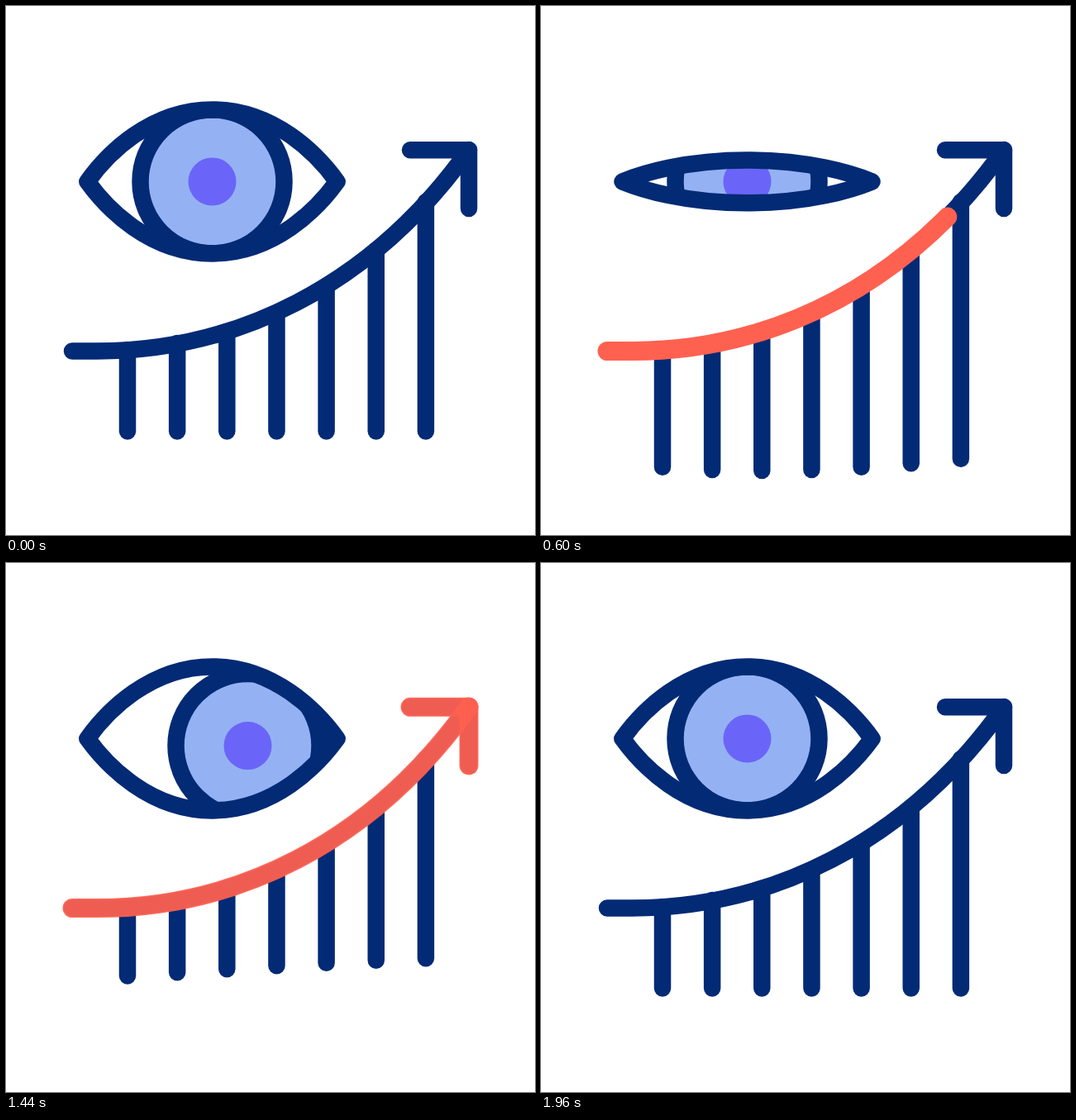
Animation, 640 px wide and 640 px high, one loop 2000 ms. Source, as an HTML page:

```html
<!DOCTYPE html>
<html lang="en">
<head>
<meta charset="utf-8">
<title>Vision and growth</title>
<style>
  html, body { margin: 0; width: 100%; height: 100%; overflow: hidden; background: #fff; }
  svg { display: block; width: 100vw; height: 100vh; }
  .line { fill: none; stroke: #032a75; stroke-width: 20.5; stroke-linecap: round; stroke-linejoin: round; }
  .hot { stroke: #ff6150; stroke-width: 23; }
</style>
</head>
<body>
<svg viewBox="0 0 640 640">
  <clipPath id="lid"><path id="lidShape"/></clipPath>
  <g clip-path="url(#lid)">
    <g id="iris">
      <circle class="line" cx="249.5" cy="212.4" r="87" style="fill:#94b2f3"/>
      <circle cx="249.5" cy="212.4" r="29" fill="#6a65f8"/>
    </g>
  </g>
  <path id="eye" class="line"/>
  <g id="bars"></g>
  <path class="line" d="M80 417.5H110C275 417.5 440 342 560 174"/>
  <path class="line" d="M489 174.3H560V245"/>
  <path id="trend" class="line hot" pathLength="1" d="M80 417.5H110C275 417.5 440 342 560 174"/>
  <path id="head" class="line hot"/>
</svg>
<script>
  const LOOP = 2000, STEP = 40;
  const $ = id => document.getElementById(id);

  // Each track is a list of [time, value], eased in and out between stops.
  const tracks = {
    lid: [[0, 1], [520, 0.257], [1080, 1]],
    look: [[1000, 0], [1400, 1], [1480, 1], [1960, 0]],
    bar: [[80, 0], [520, 47.5], [1120, -38.3], [1680, 0]],
    trend: [[80, 0], [800, 1]],
    head: [[720, 0], [1160, 1]],
    heat: [[1360, 1], [1890, 0]]
  };

  function at(track, t) {
    if (t <= track[0][0]) return track[0][1];
    for (let i = 1; i < track.length; i++) {
      const [t0, a] = track[i - 1], [t1, b] = track[i];
      if (t < t1) {
        const k = (t - t0) / (t1 - t0);
        return a + (b - a) * k * k * (3 - 2 * k);
      }
    }
    return track[track.length - 1][1];
  }

  // Height of each bar's top on the trend curve.
  const tops = [416, 408, 394, 371, 338.5, 296, 237];
  const bars = tops.map(() => {
    const bar = document.createElementNS("http://www.w3.org/2000/svg", "path");
    bar.setAttribute("class", "line");
    return $("bars").appendChild(bar);
  });

  function eyePath(open) {
    const y = d => 212.4 + d * open;
    return `M98.5 212.4C122 ${y(-32.5)} 174 ${y(-87)} 249.5 ${y(-87)}` +
      `S377 ${y(-32.5)} 400.5 212.4C377 ${y(32.5)} 325 ${y(87)} 249.5 ${y(87)}` +
      `S122 ${y(32.5)} 98.5 212.4Z`;
  }

  function draw(t) {
    const d = eyePath(at(tracks.lid, t));
    $("eye").setAttribute("d", d);
    $("lidShape").setAttribute("d", d);

    const look = at(tracks.look, t);
    $("iris").setAttribute("transform", `translate(${43 * look} ${8.7 * look})`);

    bars.forEach((bar, i) => {
      const end = 514.5 + at(tracks.bar, t - 40 * i);
      bar.setAttribute("d", `M${147 + 60.15 * i} ${tops[i]}V${end}`);
    });

    const heat = at(tracks.heat, t);
    const drawn = at(tracks.trend, t);
    $("trend").setAttribute("stroke-dasharray", drawn < 1 ? `${drawn} 2` : "none");
    $("trend").setAttribute("opacity", drawn > 0 ? heat : 0);

    const grown = at(tracks.head, t);
    $("head").setAttribute("d", `M${560 - 71 * grown} 174.3H560V${174.3 + 70.7 * grown}`);
    $("head").setAttribute("opacity", grown > 0 ? heat : 0);
  }

  const start = performance.now();
  function tick() {
    const t = (performance.now() - start) % LOOP;
    draw(Math.floor(t / STEP) * STEP);
    requestAnimationFrame(tick);
  }
  draw(0);
  requestAnimationFrame(tick);
</script>
</body>
</html>
```
